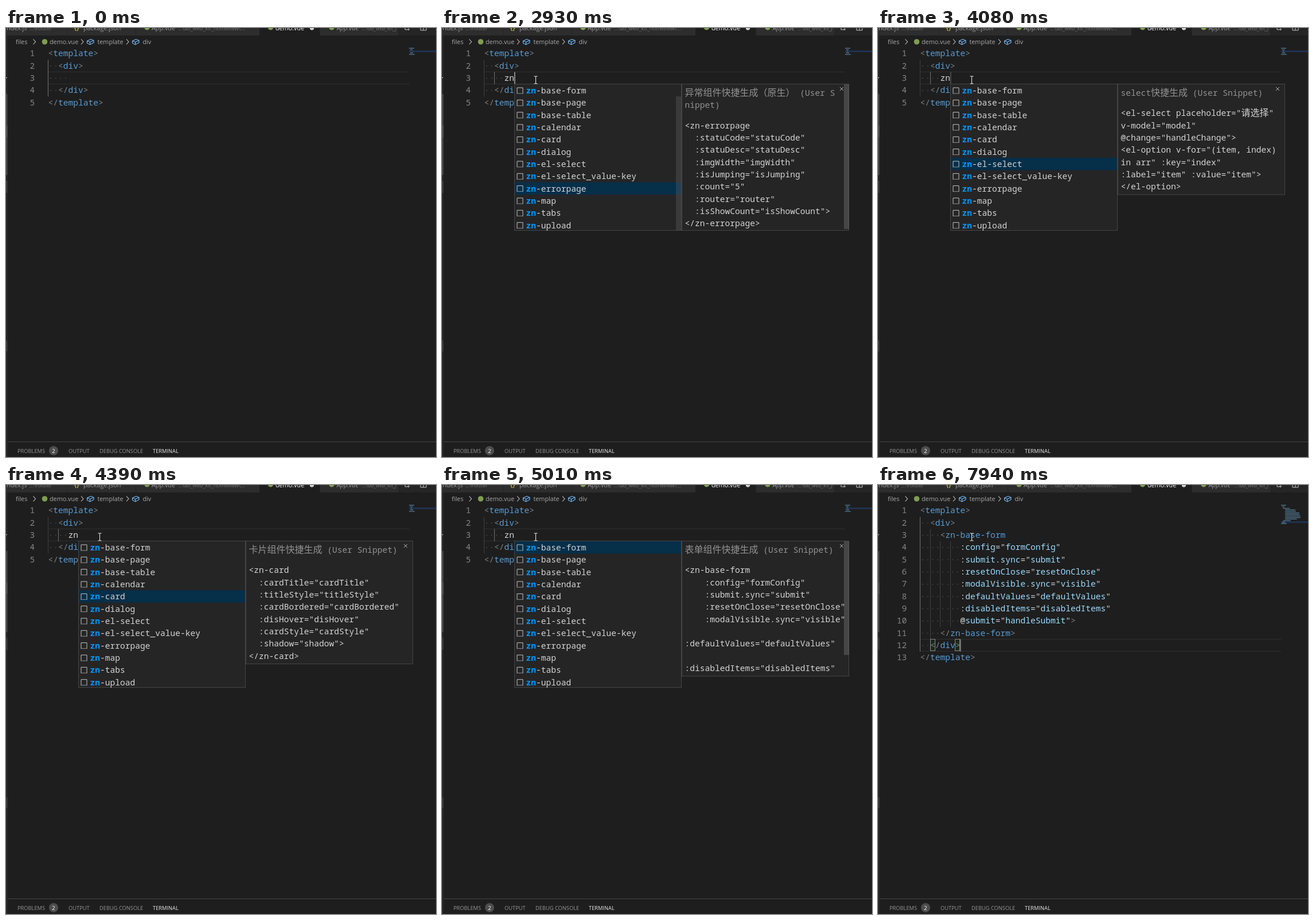
An HTML page with a canvas that plays this animation: 750x747 px, repeating every 8000 ms.

```html
<!DOCTYPE html>
<html lang="en">
<head>
<meta charset="utf-8">
<title>Snippet completion</title>
<style>
html, body { margin: 0; width: 100%; height: 100%; overflow: hidden; background: #1e1e1e; }
canvas { display: block; }
</style>
</head>
<body>
<canvas width="750" height="747"></canvas>
<script>
const ctx = document.querySelector('canvas').getContext('2d');
const LOOP = 8000, ROW = 64 / 3, TOP = 34, LEFT = 73.5, PITCH = 8.75;
const MONO = '14.58px "Noto Sans Mono", monospace';
const CJK = '16px "Noto Sans CJK SC", "Noto Sans CJK", sans-serif';
const UI = '"Open Sans", sans-serif';
const PLAIN = '#d4d4d4', GREEN = '#7f9f50';

const TYPE_Z = 2150, TYPE_N = 2225, INSERT = 5870, MOVE_DOWN = 7330;

const formLines = `<template>
  <div>
    <zn-base-form
        :config="formConfig"
        :submit.sync="submit"
        :resetOnClose="resetOnClose"
        :modalVisible.sync="visible"
        :defaultValues="defaultValues"
        :disabledItems="disabledItems"
        @submit="handleSubmit">
    </zn-base-form>
  </div>
</template>`.split('\n');

const items = ['base-form', 'base-page', 'base-table', 'calendar', 'card', 'dialog',
  'el-select', 'el-select_value-key', 'errorpage', 'map', 'tabs', 'upload'];

const attrs = (tag, names) =>
  [`<zn-${tag}`, ...names.split(' ').map(n => `  :${n}="${n}"`)].join('\n') + `>\n</zn-${tag}>`;

// Documentation per item; thumb is the bottom of the scrollbar, if any.
const docs = {
  'base-form': { head: '表单组件快捷生成 (User Snippet)', thumb: 296, code: `<zn-base-form
    :config="formConfig"
    :submit.sync="submit"
    :resetOnClose="resetOnClose"
    :modalVisible.sync="visible"

:defaultValues="defaultValues"

:disabledItems="disabledItems"` },
  'base-page': { head: '页面组件快捷生成 (User Snippet)', code: attrs('base-page', 'config tableData total loading pageSize') },
  'base-table': { head: '表格组件快捷生成 (User Snippet)', code: attrs('base-table', 'columns tableData loading border height') },
  'calendar': { head: '日历组件快捷生成 (User Snippet)', code: attrs('calendar', 'date events range firstDay') },
  'card': { head: '卡片组件快捷生成 (User Snippet)',
    code: attrs('card', 'cardTitle titleStyle cardBordered disHover cardStyle shadow') },
  'dialog': { head: '弹窗组件快捷生成 (User Snippet)', code: attrs('dialog', 'visible title width footer') },
  'el-select': { head: 'select快捷生成 (User Snippet)', code: `<el-select placeholder="请选择"
v-model="model"
@change="handleChange">
<el-option v-for="(item, index)
in arr" :key="index"
:label="item" :value="item">
</el-option>` },
  'el-select_value-key': { head: 'select快捷生成（以对象形式value-\nkey） (User Snippet)', thumb: 313,
    code: `<el-select placeholder="请选择"
v-model="model"
@change="handleChange" value-
key="key">
<el-option v-for="(item, index)
in arr" :key="index"
:label="item.key" :value="item">
</el-option>` },
  'errorpage': { head: '异常组件快捷生成（原生） (User S\nnippet)', thumb: 350, code: `<zn-errorpage
  :statuCode="statuCode"
  :statuDesc="statuDesc"
  :imgWidth="imgWidth"
  :isJumping="isJumping"
  :count="5"
  :router="router"
  :isShowCount="isShowCount">
</zn-errorpage>` }
};

// Times at which the selection steps up by one item, starting at "errorpage".
const keyTimes = [3620, 3930, 4160, 4390, 4550, 4700, 4850, 5010];

const caretKeys = [[0, 0], [480, 0], [640, 1], [1510, 1], [1690, 0], [2149, 0], [2150, 1],
  [2920, 1], [3040, 0], [3520, 0], [3700, 1], [3930, 1], [4160, 0], [4530, 0], [4690, 1],
  [4840, 1], [5010, 0], [5480, 0], [5640, 1], [6460, 1], [6640, 0], [7090, 0], [7200, 1],
  [7880, 1], [8000, .3]];
const mouseKeys = [[230, 503, 468], [460, 300, 200], [690, 108, 30], [840, 148, 80],
  [1000, 157, 89], [1070, 163.5, 90.5]];

function track(keys, t) {
  const i = keys.findIndex(k => k[0] > t);
  if (i < 1) return (i ? keys[keys.length - 1] : keys[0]).slice(1);
  const a = keys[i - 1], b = keys[i], f = (t - a[0]) / (b[0] - a[0]);
  return a.slice(1).map((v, j) => v + (b[j + 1] - v) * f);
}

function rect(x, y, w, h, color) {
  ctx.fillStyle = color;
  ctx.fillRect(x, y, w, h);
}

function dot(x, y, r, color) {
  ctx.fillStyle = color;
  ctx.beginPath();
  ctx.arc(x, y, r, 0, 7);
  ctx.fill();
}

function path(d, x, y, color, width = 1) {
  ctx.save();
  ctx.translate(x, y);
  ctx.strokeStyle = color;
  ctx.lineWidth = width;
  ctx.stroke(new Path2D(d));
  ctx.restore();
}

function label(str, x, y, size, color, style = '') {
  ctx.font = `${style} ${size}px ${UI}`;
  ctx.fillStyle = color;
  ctx.fillText(str, x, y);
}

function mono(str, x, y, color, style = '') {
  ctx.fillStyle = color;
  for (const run of str.match(/[\u2e80-\uffff]+|[^\u2e80-\uffff]+/g) || []) {
    ctx.font = run > '\u2e80' ? CJK : `${style} ${MONO}`;
    ctx.fillText(run, x, y);
    x += ctx.measureText(run).width;
  }
}

function frameBox(x, y, w, h, fill, stroke) {
  rect(x, y, w, h, fill);
  ctx.strokeStyle = stroke;
  ctx.lineWidth = 1;
  ctx.strokeRect(x + .5, y + .5, w - 1, h - 1);
}

function drawTabs() {
  rect(0, 0, 750, 13, '#252526');
  for (const [x, w] of [[0, 106], [107, 119], [227, 215], [548, 136]]) rect(x, 0, w, 13, '#2d2d2d');
  rect(442, 0, 105, 13, '#1e1e1e');
  const grey = '#969696', dim = '#707070';
  label('ndex.js', 1, 4, 10.8, grey);
  label('...\\router', 41, 4, 9.5, dim);
  label('{}', 119, 4, 10.8, '#a9a94f', 'bold');
  label('package.json', 135, 4, 10.8, grey);
  label('App.vue', 254, 4, 10.8, grey);
  label('...\\ab_web_kit_homeview\\...', 300, 4, 9.2, dim);
  label('demo.vue', 470, 4, 10.8, '#fff');
  label('App.vue', 577, 4, 10.8, grey, 'italic');
  ctx.save();
  ctx.beginPath();
  ctx.rect(0, 0, 683, 13);
  ctx.clip();
  label('...\\ab_web_kit_j', 621, 4, 9.2, dim, 'italic');
  ctx.restore();
  for (const x of [246, 461.5, 568]) dot(x, -1, 4.5, GREEN);
  dot(533.5, 0, 3.7, '#d0d0d0');
  path('M-3 -2V2H1M3 -3V3M1 1L3 3L5 1', 699, 1, '#c5c5c5');
  path('M-5 -5V3.5H5V-5M0 -5V3.5', 728, .5, '#c5c5c5');
}

function drawBreadcrumbs(t) {
  const color = '#a9a9a9';
  const chevron = x => path('M0 0L4 4.5L0 9', x, 19.5, '#c5c5c5', 1.1);
  const symbol = (x, name) => {
    chevron(x);
    path('M.5 4.5L7 1.5L12 3.5V7.5L5.5 11L.5 8.5ZM.5 4.5L5.5 6.5V11M5.5 6.5L12 3.5', x + 10, 18, '#75beff', 1.1);
    label(name, x + 28.5, 28, 10.8, color);
  };
  label('files', 17, 28, 10.8, color);
  chevron(47.5);
  dot(67.5, 24, 4.8, GREEN);
  label('demo.vue', 76, 28, 10.8, t > 610 && t < 770 ? '#e0e0e0' : color);
  symbol(131, 'template');
  symbol(210, 'div');
  if (t >= 6250 && t < 7410) symbol(259, 'zn-base-form');
}

function drawChrome() {
  rect(0, 13, 3, 734, '#262627');
  rect(0, 115, 2.5, 141, '#474747');
  rect(0, 170, 2.5, 20, '#525252');
  rect(0, 266, 2.5, 21, '#3b3b3c');
  rect(0, 544, 2.5, 19, '#3b3b3c');
  rect(0, 86, 2, 1, '#c5c5c5');
  rect(3, 720, 747, 1, '#434343');
  const grey = '#969696';
  label('PROBLEMS', 20, 740, 9.3, grey);
  label('OUTPUT', 109, 740, 9.3, grey);
  label('DEBUG CONSOLE', 163, 740, 9.3, grey);
  label('TERMINAL', 256, 740, 9.3, '#e7e7e7');
  dot(83, 736, 8, '#4d4d4d');
  label('2', 80.3, 739.5, 9.5, '#fff');
}

function drawCode(line, y) {
  const colored = line.includes('=');
  let col = 0, previous = '';
  for (const token of line.match(/<\/?|>|[\w-]+|./g)) {
    const x = LEFT + col * PITCH;
    if (token === ' ') {
      rect(x + 3.6, y - 5.3, 1.7, 1.7, '#454545');
    } else {
      const color = /[<>]/.test(token) ? '#808080'
        : previous[0] === '<' ? '#569cd6'
        : colored && /\w/.test(token) ? '#9cdcfe' : PLAIN;
      mono(token, x, y, color);
    }
    col += token.length;
    previous = token;
  }
}

function drawEditor(t) {
  const inserted = t >= INSERT, typed = t < TYPE_Z ? '' : t < TYPE_N ? 'z' : 'zn';
  const lines = inserted ? formLines
    : [...formLines.slice(0, 2), '    ' + typed, ...formLines.slice(-2)];
  const current = !inserted ? 2 : t < MOVE_DOWN ? 10 : 11;
  const rowTop = i => TOP + i * ROW;
  const guide = (col, from, to, active) =>
    rect(Math.floor(LEFT + col * PITCH), rowTop(from), 1, (to - from + 1) * ROW, active ? '#707070' : '#404040');

  rect(73, Math.floor(rowTop(current)), 630, 1, '#303030');
  rect(73, Math.floor(rowTop(current + 1)) - 1, 630, 1, '#303030');

  const inner = inserted ? current === 10 : typed !== '';
  guide(0, 1, lines.length - 2, !inner);
  if (inserted || typed) guide(2, 2, lines.length - 3, inner);
  if (inserted) {
    guide(4, 3, 9);
    guide(6, 3, 9);
  }

  if (current === 11) {
    for (const col of [2, 7]) {
      frameBox(Math.floor(LEFT + col * PITCH), 268, 9, 21, 'rgba(0,100,0,.15)', '#888');
    }
  }

  rect(703, TOP + current * ROW / 8, 47, ROW / 8, '#1f3354');
  lines.forEach((line, i) => {
    const y = rowTop(i) + 15.3, number = String(i + 1);
    mono(number, 50.3 - number.length * PITCH, y, '#858585');
    drawCode(line, y);
    const text = line.trim(), indent = line.length - text.length;
    rect(703 + indent * .89, TOP + .6 + i * ROW / 8, text.length * .89, 1.4, 'rgba(110,165,205,.65)');
  });

  ctx.globalAlpha = track(caretKeys, t)[0];
  rect(Math.round(LEFT + lines[current].length * PITCH - .4), rowTop(current), 1.6, ROW, '#aeafad');
  ctx.globalAlpha = 1;
}

function drawList(t, selected) {
  frameBox(126, 97, 292, 256, '#252526', '#454545');
  const selectedTop = 98 + selected * ROW;
  const highlight = () => rect(127, selectedTop, 290, ROW, '#062f4a');
  highlight();
  if (t < 3540) {
    rect(408, 119, 9, 233, 'rgba(121,121,121,.25)');
    if (t >= 3310) highlight();
  }
  items.forEach((name, i) => {
    const y = 114 + i * ROW;
    path('M.5 10V.5H10.5V10', 130.5, y - 10.5, '#c5c5c5');
    path('M0 10.5H2M3 10.5H5M6 10.5H8M9 10.5H11', 130.5, y - 10.5, '#c5c5c5');
    mono('zn', 146.5, y, '#0097fb', 'bold');
    mono('-' + name, 146.5 + 2 * PITCH, y, PLAIN);
  });
}

function drawDoc({ head, code, thumb }) {
  const heads = head.split('\n'), codes = code.split('\n');
  const height = Math.min(255, (heads.length + codes.length) * ROW + 22);
  frameBox(418, 97, 292, height + 1, '#252526', '#454545');
  ctx.save();
  ctx.beginPath();
  ctx.rect(419, 98, 285, height - 1);
  ctx.clip();
  heads.forEach((line, i) => mono(line, 423.5, 117.7 + i * ROW, '#929292'));
  const codeTop = 131.9 + heads.length * ROW;
  codes.forEach((line, i) => mono(line, 423.5, codeTop + i * ROW, PLAIN));
  ctx.restore();
  if (thumb) rect(701, 98, 9, thumb - 98, 'rgba(121,121,121,.4)');
  path('M-3 -3L3 3M3 -3L-3 3', 697, 106, '#b0b0b0');
}

function drawMouse(t) {
  if (t < 230) return;
  const [x, y] = track(mouseKeys, t);
  path('M-3 -6.5H-1L0 -5.5L1 -6.5H3M0 -5.5V5.5M-3 6.5H-1L0 5.5L1 6.5H3', x, y, '#e4e4e4', 1.1);
}

function draw() {
  const t = performance.now() % LOOP;
  rect(0, 0, 750, 747, '#1e1e1e');
  drawTabs();
  drawBreadcrumbs(t);
  drawChrome();
  drawEditor(t);
  if (t >= TYPE_N && t < INSERT) {
    const selected = 8 - keyTimes.filter(k => k <= t).length;
    drawList(t, selected);
    drawDoc(docs[items[selected]]);
  }
  drawMouse(t);
  requestAnimationFrame(draw);
}
draw();
</script>
</body>
</html>
```
